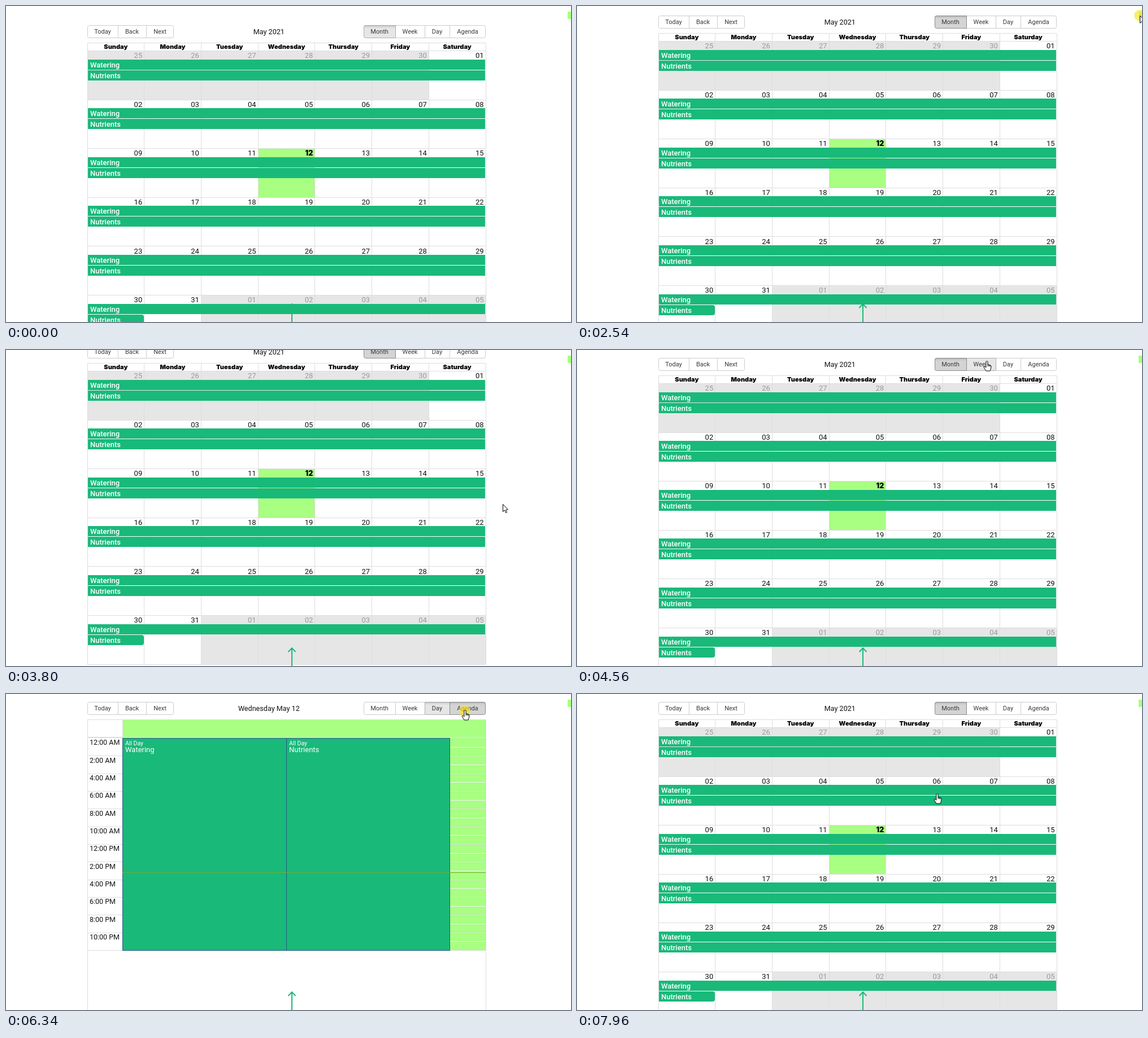
An HTML page with a canvas for the animation above (8000 ms loop, 1000 by 560 pixels).

```html
<!DOCTYPE html>
<html lang="en">
<head>
<meta charset="utf-8">
<title>Plant calendar</title>
<style>
html, body { margin: 0; width: 100%; height: 100%; overflow: hidden; background: #fff; }
canvas { display: block; width: 1000px; height: 560px; }
</style>
</head>
<body>
<canvas id="stage" width="1000" height="560"></canvas>
<script>
const ctx = document.getElementById('stage').getContext('2d');
const LOOP = 8000;
const LEFT = 144, RIGHT = 849, GUTTER = 206;
const GREEN = '#19b97a', TODAY = '#a8ff82', LINE = '#ddd', MUTED = '#e6e6e6';
const DAYS = ['Sunday', 'Monday', 'Tuesday', 'Wednesday', 'Thursday', 'Friday', 'Saturday'];
const pad = n => String(n).padStart(2, '0');

// Timed states: [start, value]
const VIEWS = [[0, 'Month'], [4960, 'Week'], [5570, 'Day'], [6350, 'Agenda'], [7270, 'Month']];
const FOCUS = [[0, ''], [2000, 'Month'], [4810, 'Week'], [5490, 'Day'], [6200, 'Agenda'], [6970, 'Month']];
const SCROLL = [[0, 0], [2540, 17], [2620, 52], [2690, 84], [2770, 99],
  [3720, 84], [3800, 42], [3870, 20.1]];
const CLICKS = [[2000, 3090], [4810, 4960], [5490, 5570], [6200, 6350], [6970, 7270]];

// Cursor moves: [start, end, steps, x, y]
const ENTRY = { x: 961, y: 370 };
const MOVES = [
  [290, 450, 3, 958, 208],
  [610, 1240, 9, 977, 44],
  [1850, 2080, 4, 996, 16],
  [2540, 2770, 4, 996, 19],
  [3090, 3550, 7, 879, 273],
  [4180, 4560, 6, 725, 19],
  [5110, 5420, 5, 760, 26],
  [5720, 5950, 4, 812, 28],
  [6420, 6720, 5, 673, 22.5],
  [7730, 7960, 4, 637, 176]
];

const TITLES = {
  Month: 'May 2021',
  Week: 'May 09 – 15',
  Day: 'Wednesday May 12',
  Agenda: '05/12/2021 – 06/11/2021'
};
const NAV = [['Today', 144, 198], ['Back', 198, 248], ['Next', 248, 297]];
const TABS = [['Month', 633, 689], ['Week', 689, 741], ['Day', 741, 785], ['Agenda', 785, 849]];

const at = (list, t) => list.reduce((value, [start, next]) => t >= start ? next : value, list[0][1]);
const crisp = v => Math.floor(v) + 0.5;

function cursorAt(t) {
  let { x, y } = ENTRY;
  for (const [start, end, steps, tx, ty] of MOVES) {
    if (t < start) break;
    const gap = (end - start) / (steps - 1);
    const p = Math.min(1, (Math.floor((t - start) / gap + 0.01) + 1) / steps);
    x += (tx - x) * p;
    y += (ty - y) * p;
  }
  return { x, y };
}

function rect(x, y, w, h, color) {
  ctx.fillStyle = color;
  ctx.fillRect(x, y, w, h);
}

function line(x1, y1, x2, y2, color = LINE, width = 1) {
  ctx.strokeStyle = color;
  ctx.lineWidth = width;
  ctx.beginPath();
  ctx.moveTo(x1, y1);
  ctx.lineTo(x2, y2);
  ctx.stroke();
}
const hline = (x1, x2, y, color, width) => line(x1, crisp(y), x2, crisp(y), color, width);
const vline = (x, y1, y2, color) => line(crisp(x), y1, crisp(x), y2, color);

function text(str, x, mid, { size = 13, weight = 400, color = '#111', align = 'left', family = 'Roboto' } = {}) {
  ctx.font = `${weight} ${size}px ${family}, sans-serif`;
  ctx.fillStyle = color;
  ctx.textAlign = align;
  ctx.fillText(str, x, mid + size * 0.36);
}
const heading = (str, x, mid, align = 'center', size = 11) =>
  text(str, x, mid, { size, weight: 900, color: '#000', align, family: 'Inter' });

function roundBox(x, y, w, h, radii, fill, stroke) {
  ctx.beginPath();
  ctx.roundRect(x, y, w, h, radii);
  if (fill) { ctx.fillStyle = fill; ctx.fill(); }
  if (stroke) { ctx.strokeStyle = stroke; ctx.lineWidth = 1; ctx.stroke(); }
}

function buttonGroup(buttons, top, styleOf) {
  const last = buttons.length - 1;
  const items = buttons.map((button, i) => ({ button, i, style: styleOf(button) }));
  // Raised buttons go last so that their borders cover the neighbours
  items.sort((a, b) => a.style.level - b.style.level);
  for (const { button: [label, x1, x2], i, style } of items) {
    const l = i === 0 ? 3 : 0, r = i === last ? 3 : 0;
    const x = x1 + 0.5, w = x2 - x1 - (i === last ? 1 : 0);
    roundBox(x, top, w, 22, [l, r, r, l], style.fill, style.border);
    if (style.inset) {
      const shade = ctx.createLinearGradient(0, top, 0, top + 5);
      shade.addColorStop(0, 'rgba(0,0,0,.13)');
      shade.addColorStop(1, 'rgba(0,0,0,0)');
      rect(x, top, w, 5, shade);
    }
    text(label, (x1 + x2) / 2, top + 11, { size: 11, color: '#373a3c', align: 'center' });
  }
}

function toolbar(top, view, focus, cursor) {
  const styleOf = ([label, x1, x2]) => {
    const hover = cursor.x > x1 && cursor.x < x2 && cursor.y > top && cursor.y < top + 22;
    if (label === focus) return { level: 2, fill: '#d4d4d4', border: '#8c8c8c', inset: true };
    if (label === view) return { level: 1, fill: MUTED, border: '#adadad', inset: true };
    if (hover) return { level: 1, fill: MUTED, border: '#adadad' };
    return { level: 0, fill: '#fff', border: '#ccc' };
  };
  buttonGroup(NAV, top, styleOf);
  buttonGroup(TABS, top, styleOf);
  text(TITLES[view], 465.3, top + 11, { size: 12.6, align: 'center' });
}

function scrollArrow() {
  const x = 506;
  line(x, 529, x, 560, GREEN, 2);
  ctx.beginPath();
  ctx.moveTo(x - 6.5, 535);
  ctx.lineTo(x, 528.3);
  ctx.lineTo(x + 6.5, 535);
  ctx.stroke();
}

function monthView(top) {
  const colW = (RIGHT - LEFT) / 7, rowH = 86.6, first = top + 13.9;
  const bottom = first + rowH * 6;
  const colX = c => LEFT + colW * c;
  const cells = Array.from({ length: 42 }, (_, i) => {
    const date = new Date(2021, 3, 25 + i);
    return {
      day: date.getDate(), x: colX(i % 7), y: first + rowH * Math.floor(i / 7),
      muted: date.getMonth() !== 4, today: date.getMonth() === 4 && date.getDate() === 12
    };
  });

  for (const { x, y, muted, today } of cells) {
    const fill = today ? TODAY : muted ? MUTED : null;
    if (fill) rect(Math.round(x), Math.round(y), Math.round(colW), Math.round(rowH), fill);
  }
  for (let c = 0; c <= 7; c++) vline(colX(c), top, bottom);
  hline(LEFT, RIGHT, top);
  for (let r = 0; r <= 6; r++) hline(LEFT, RIGHT, first + rowH * r);
  DAYS.forEach((day, c) => heading(day, colX(c + 0.5), top + 6.7));
  scrollArrow();

  for (const { day, x, y, muted, today } of cells) {
    const right = x + colW - 3.5;
    if (today) heading(pad(day), right, y + 8, 'right', 12.5);
    else text(pad(day), right, y + 8, { align: 'right', color: muted ? '#999' : '#111' });
  }
  for (let r = 0; r < 6; r++) {
    ['Watering', 'Nutrients'].forEach((name, i) => {
      const y = Math.round(first + rowH * r + 15.2) + i * 19;
      const short = r === 5 && i === 1;
      roundBox(145, y, short ? 99 : 703, 18, short ? [0, 4, 4, 0] : 0, GREEN);
      text(name, 149, y + 9.2, { weight: 500, color: '#fff' });
    });
  }
}

function dayCards(top) {
  if (top > 560) return;
  for (let i = 0; i < 7; i++) {
    const x = Math.round(175 + 94.1 * i);
    rect(x, top, 78, 100, '#000');
    rect(x + 2, top + 2, 74, 96, i < 5 ? '#7d6349' : GREEN);
    text('Day:', x + 9, top + 15, { size: 9.5, color: '#000' });
    text(String(i + 1), x + 39, top + 29, { size: 22, color: '#fff', align: 'center' });
  }
  scrollArrow();
}

function timeEvent(x, y, w, h, lines) {
  rect(x, y, w, h, GREEN);
  ctx.strokeStyle = '#265985';
  ctx.lineWidth = 1;
  ctx.strokeRect(x, y, w, h);
  ctx.save();
  ctx.beginPath();
  ctx.rect(x, y, w, h);
  ctx.clip();
  lines.forEach((str, i) =>
    text(str, x + 4.5, y + [8.5, 20, 33][i], { size: i ? 13 : 10.5, color: '#fff' }));
  ctx.restore();
}

function timeView(top, days, todayIndex) {
  const single = days.length === 1;
  const colW = (RIGHT - GUTTER) / days.length, slot = 31.33;
  const allDay = top + (single ? 0 : 15.7);
  const start = crisp(allDay + 33.2), end = start + slot * 12;
  const colX = c => Math.round(GUTTER + colW * c);

  rect(colX(todayIndex), top, colX(todayIndex + 1) - colX(todayIndex), end - top, TODAY);
  for (let i = 0; i < 12; i++) {
    const y = start + slot * i;
    hline(GUTTER, RIGHT, y + slot / 2, '#f0f0f0');
    hline(LEFT, RIGHT, y + slot);
    text(`${(i * 2) % 12 || 12}:00 ${i < 6 ? 'AM' : 'PM'}`, 148, y + 7.3, { size: 12.5 });
  }
  hline(LEFT, RIGHT, top);
  if (!single) hline(GUTTER, RIGHT, allDay);
  line(LEFT, start - 1.5, RIGHT, start - 1.5, LINE, 2);
  days.forEach((_, c) => vline(colX(c), top, end));
  vline(LEFT, top, top + 534);
  vline(RIGHT, top, top + 534);

  const firstW = Math.ceil(colW * 0.45), secondW = Math.floor(colW * 0.45);
  days.forEach((label, c) => {
    const x = crisp(colX(c));
    heading(label, GUTTER + colW * (c + 0.5), top + 6.5);
    timeEvent(x, start, firstW, end - start, ['All Day', 'Watering']);
    timeEvent(x + firstW, start, secondW, end - start,
      single ? ['All Day', 'Nutrients'] : ['All D…', 'Nutri', 'ents']);
  });
  hline(colX(todayIndex), colX(todayIndex + 1), start + 238, '#74ad31');
  scrollArrow();
}

function agendaView(top) {
  const rowH = 23.55, first = top + 19;
  [['Date', 148], ['Time', 235], ['Event', 322]].forEach(([label, x]) =>
    heading(label, x, top + 9, 'left', 11.5));
  hline(LEFT, RIGHT, top);
  line(LEFT, first, RIGHT, first, LINE, 2);
  [LEFT, 230, 318, RIGHT].forEach(x => vline(x, top, 560));
  for (let i = 0; i < 22; i++) {
    const y = first + rowH * i, mid = y + 12.3;
    hline(i % 2 ? LEFT : 230, RIGHT, y + rowH);
    if (i % 2 === 0) {
      const date = new Date(2021, 4, 12 + i / 2);
      text(`${DAYS[date.getDay()].slice(0, 3)} May ${date.getDate()}`, 152, mid, { size: 12.2 });
    }
    text('« all day »', 271, mid, { size: 12.9, align: 'center' });
    text(i % 2 ? 'Nutrients' : 'Watering', 326, mid);
  }
  scrollArrow();
}

const ARROW = new Path2D('M0 0V13L3 10.3L5.2 15L7.2 14.1L5.1 9.7L9 9.3Z');
const HAND = new Path2D('M-1.6 1.2Q0 -.8 1.6 1.2V6.2L6 7.4Q7.6 8 7.6 10L6.8 14L5.6 17.6H-1.4' +
  'L-5.2 11.6Q-5.8 9.4 -4 9.8L-1.6 11.6Z');
const KNUCKLES = new Path2D('M1.6 6V9.5M3.7 6.8V9.8M5.7 7.4V10');

function drawCursor({ x, y }, hand, pressed) {
  if (pressed) {
    ctx.fillStyle = 'rgba(250,228,35,.65)';
    ctx.beginPath();
    ctx.arc(x, y + (hand ? 2 : 0), 10, 0, Math.PI * 2);
    ctx.fill();
  }
  ctx.save();
  ctx.translate(x + 0.5, y + 0.5);
  ctx.fillStyle = '#fff';
  ctx.strokeStyle = '#000';
  ctx.lineWidth = 1;
  const shape = hand ? HAND : ARROW;
  ctx.fill(shape);
  ctx.stroke(shape);
  if (hand) ctx.stroke(KNUCKLES);
  ctx.restore();
}

function draw(t) {
  const scroll = at(SCROLL, t), view = at(VIEWS, t);
  const cursor = cursorAt(t);
  const top = 65.6 - scroll;
  rect(0, 0, 1000, 560, '#fff');

  if (view === 'Month') {
    monthView(top);
    dayCards(Math.round(631 - scroll));
  } else if (view === 'Week') {
    timeView(top, DAYS.map((day, i) => `${pad(9 + i)} ${day.slice(0, 3)}`), 3);
  } else if (view === 'Day') {
    timeView(top, [''], 0);
  } else {
    agendaView(top);
  }
  toolbar(crisp(34.7 - scroll), view, at(FOCUS, t), cursor);
  rect(994, 10, 6, 13, TODAY);

  if (t >= MOVES[0][0]) {
    const pressed = CLICKS.some(([from, to]) => t >= from && t < to);
    drawCursor(cursor, cursor.x < 848, pressed);
  }
}

let origin;
function tick(now) {
  origin ??= now;
  draw((now - origin) % LOOP);
  requestAnimationFrame(tick);
}
requestAnimationFrame(tick);
</script>
</body>
</html>
```
